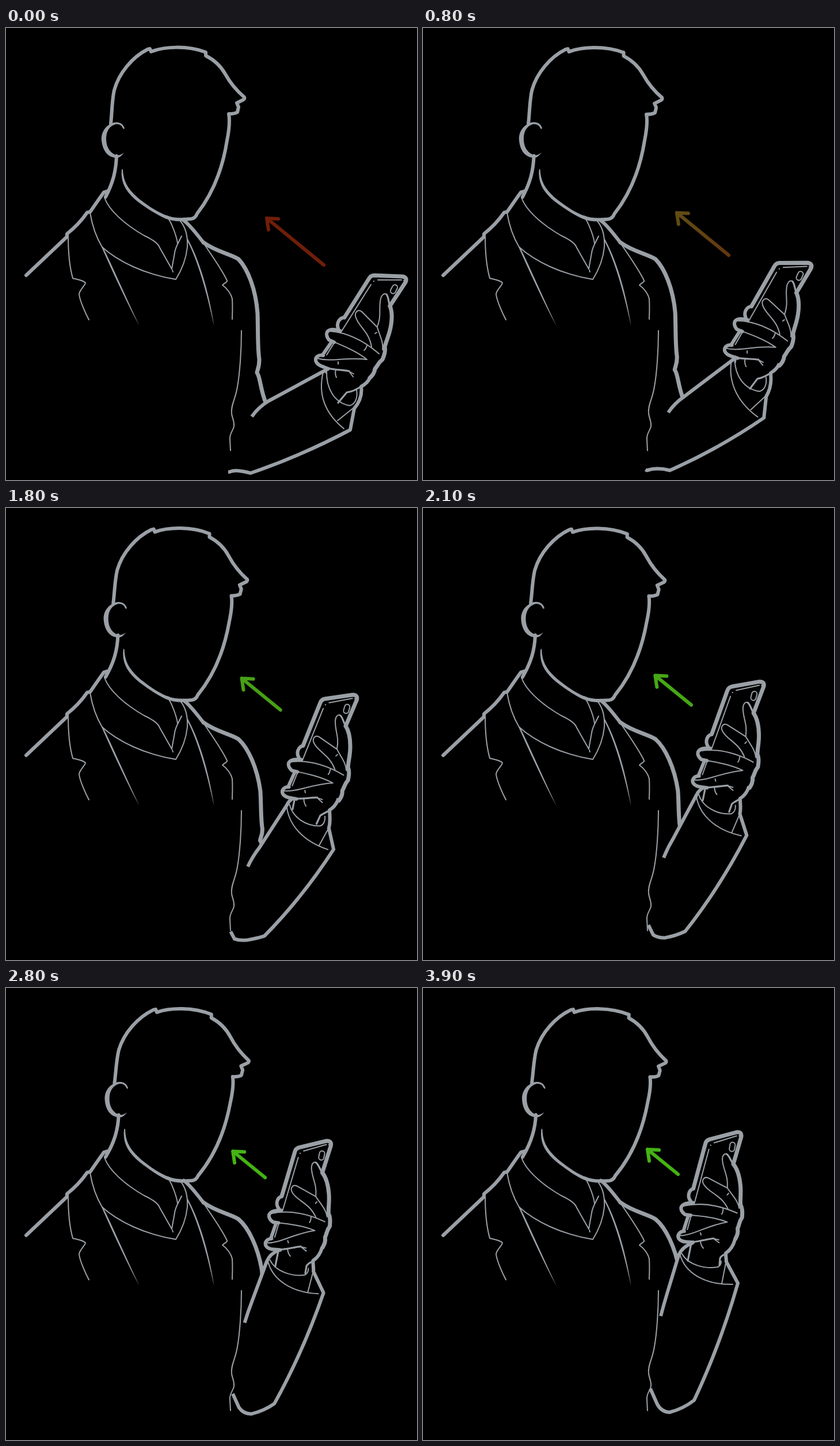
Write an HTML page that moves like this. It is 714 px wide and 784 px high and loops after 4 s.

```html
<!DOCTYPE html>
<html lang="en">
<head>
<meta charset="utf-8">
<title>Raise the phone</title>
<style>
html, body { margin: 0; width: 100%; height: 100%; overflow: hidden; background: #000; }
svg { display: block; width: 714px; height: 784px; }
.line { fill: none; stroke: #9aa0a6; stroke-linecap: round; stroke-linejoin: round; }
.thick { stroke-width: 6; }
.heavy { stroke-width: 7; }
.mid { stroke-width: 3.2; }
.thin { stroke-width: 2; }
.solid { fill: #9aa0a6; }
.mask { fill: #000; }
.butt { stroke-linecap: butt; }
</style>
</head>
<body>
<svg viewBox="0 0 714 784">
  <defs>
    <linearGradient id="tint" gradientUnits="userSpaceOnUse">
      <stop id="tipTint"/><stop id="tailTint" offset="1"/>
    </linearGradient>
  </defs>

  <g id="torso">
    <path class="line thick" d="M35 429L106 362V357C120 346 132 333 141 320L146 319C153 309 162 296 170 285L177 283"/>
    <path class="line thin" d="M108 360C108 395 112 420 116 434C122 436 133 437 138 442C138 446 127 455 127 462C128 472 138 495 144 506"/>
    <path class="line thin" d="M146 320C150 345 158 365 167 380C195 405 240 427 295 436C305 420 313 400 315 380C316 362 312 346 303 335"/>
    <path class="line thin" d="M171 294C178 315 205 340 240 360C255 367 265 374 267 381L288 418L293 390C294 380 300 372 305 361M283 332C288 340 297 362 298 374M289 420L290 423"/>
    <path class="solid" d="M166 380C184 420 209 475 232 517C212 475 188 420 168 379Z"/>
    <path class="solid" d="M314 367C334 405 349 460 361.500 517C353 460 337 405 316 366Z"/>
    <path class="line thin" d="M345 376C365 405 378 425 384 438C386 440 378 443 376 446C382 450 391 460 393 470C394 485 393 500 393 505"/>
    <path class="line thick" d="M309 334C320 342 335 362 342 371"/>
  </g>
  <path id="shoulder" class="line heavy"/>
  <path id="neck" class="line thick"/>

  <g id="head">
    <path class="line thick" d="M182 166C184 150 184 125 188 108C196 78 220 50 246 37L250 36L252 41C275 32 315 30 347 42V48C361 55 372 64 381 80C391 98 401 109 414 120Q415 122 413 124L401 130L404 137L402 146Q397 149 387 149C389 160 387 180 384 195C377 240 361 285 332 322Q329 330 322 331C305 333 290 333 279 328"/>
    <path class="solid" d="M201 246C199 268 208 285 230 302C248 315 262 324 278 331L281 326C262 319 248 309 232 297C213 281 204 268 203 246Q202 243 201 246Z"/>
    <path class="solid" d="M206 174C203 163 191 161 182 166C169 173 165 185 166 195C168 214 178 226 194 225C199 224 202 220 205 216C200 220 195 222 190 220C178 215 174 203 174 192C174 179 180 170 190 167C197 166 201 169 203 174Q205 176 206 174Z"/>
  </g>

  <path id="armFill" class="mask"/>
  <path class="line thin" d="M409 525C409 560 406 600 402 622C399 643 390 655 392 669C393 677 397 682 396 691C394 700 388 703 389 714L390 733"/>
  <path id="armTop" class="line thick butt"/>
  <path id="armLow" class="line thick butt"/>
  <path id="cuff" class="line thin"/>
  <path id="wrist" class="line mid"/>
  <path id="cuffRim" class="line thick"/>

  <g id="hand">
    <path class="line heavy" d="M588 502L631 434Q634 429 640 429L689 431Q698 433 694 441L667 482"/>
    <path class="line thin" d="M634 445L557 567M646 437L687 437M639 439V439.500M691 438V438.500"/>
    <rect class="line thin" x="669.500" y="445" width="9" height="16" rx="4.500" transform="rotate(27 674 453)"/>
    <path class="line thick" d="M588 502C578 503 574 513 577 521"/>
    <path class="line thick" d="M566 544L550 567"/>
    <path class="mask" d="M563 525C590 527 620 541 648 565L628 575C605 560 580 549 561 541Q552 532 563 525ZM541 572C560 580 590 570 627 575L600 597C580 590 560 592 541 584ZM608 497Q611 488 618 492L645 520L654 556L635 552C630 530 610 518 608 497Z"/>
    <path class="line thin" d="M563 526C590 528 620 541 648 565M561 541C580 549 607 559 627 575C590 570 565 580 541 573"/>
    <path class="line thick" d="M580 525C572 523 563 521 558 527Q555 533 561 541L570 545"/>
    <path class="line thick" d="M551 568C543 566 537 571 538 577C540 585 550 587 560 591"/>
    <path class="line mid" d="M558 590C572 593 585 593 596 595"/>
    <path class="line thin" d="M635 553C632 535 624 527 615 515C607 504 605 496 609 492Q613 488 618 492L645 519C649 533 656 545 654 558"/>
    <path class="line thin" d="M645 518C652 500 648 490 650 475C651 463 657 459 661 462"/>
    <path class="line thin" d="M641 530L644 528M622 559C625 557 626 554 627 551M577 579V583M573 592Q571 600 574 606M595 595L604 600M597 597L603 605"/>
    <path class="line mid" d="M661 462C665 467 664 475 667 482"/>
    <path class="line heavy" d="M667 482C671 492 671 505 668 520C665 535 661 541 658 553C660 562 656 570 654 575C646 581 646 586 641 591C640 599 636 603 632 607"/>
  </g>

  <path id="arrow" fill="none" stroke="url(#tint)" stroke-width="6" stroke-linecap="round" stroke-linejoin="round"/>
</svg>

<script>
const LOOP = 4000, STEP = 100;
const times = [0, 800, 1400, 1800, 2500, 3200, 3900];
const lift = [0, .145, .42, .605, .86, .966, 1];
const approach = [0, .192, .52, .69, .885, .975, 1];
const tipColors = [[112, 30, 10], [98, 76, 20], [80, 135, 20], [72, 160, 21], [68, 179, 20]];
const tailColors = [[112, 30, 10], [98, 55, 16], [80, 135, 20], [72, 160, 21], [68, 179, 20]];

const $ = id => document.getElementById(id);
const set = (id, attrs) => {
  for (const name in attrs) $(id).setAttribute(name, attrs[name]);
};
const mix = (a, b, k) => a + (b - a) * k;

function segment(t) {
  let i = 0;
  while (i < times.length - 2 && t >= times[i + 1]) i++;
  return i;
}

// Smooth curve through the keys, at rest at both ends.
function spline(vals, t) {
  const span = i => times[i + 1] - times[i];
  const rate = i => (vals[i + 1] - vals[i]) / span(i);
  const slope = i => i === 0 || i === vals.length - 1 ? 0 :
    (rate(i - 1) * span(i) + rate(i) * span(i - 1)) / (span(i - 1) + span(i));
  const i = segment(t), h = span(i), s = (t - times[i]) / h;
  const s2 = s * s, s3 = s2 * s;
  return vals[i] * (2 * s3 - 3 * s2 + 1) + vals[i + 1] * (3 * s2 - 2 * s3)
    + h * slope(i) * (s3 - 2 * s2 + s) + h * slope(i + 1) * (s3 - s2);
}

function color(list, t) {
  const i = segment(t), k = (t - times[i]) / (times[i + 1] - times[i]);
  const last = list.length - 1;
  const a = list[Math.min(i, last)], b = list[Math.min(i + 1, last)];
  return `rgb(${a.map((v, n) => Math.round(mix(v, b[n], k)))})`;
}

// Blends two paths of equal structure; each point may lag by its own exponent.
function morph(id, from, to, lags = []) {
  const ends = to.match(/[\d.]+/g);
  return p => {
    let n = 0;
    const d = from.replace(/[\d.]+/g, v => {
      const k = Math.pow(p, lags[n >> 1] || 1);
      return mix(+v, +ends[n++], k).toFixed(2);
    });
    $(id).setAttribute("d", d);
  };
}

const shapes = [
  morph("shoulder",
    "M343 372C365 388 390 392 404 401C420 418 434 453 437 495C438 530 437 555 440 575C440 590 436 594 436 598C442 605 441 625 452 652",
    "M343 372C365 388 390 392 404 401C422 416 438 450 445 488C447 505 446 530 449 545C449 555 445 559 445 563C451 570 450 590 461 617"),
  morph("neck", "M192 222C191 250 185 270 173 293", "M196 220C195 248 187 270 173 293"),
  morph("armFill",
    "M427 674L456 647L556 593L617 622L605 660L598 697L425 772L404 768L388 770L386 770Z",
    "M413 569L424 530L444 464L526 460L527 475L547 512L471 715L428 736L407 722L395 695Z",
    [1.4, 1.4, 1, 1, 1.13, 1.13, 1.3, 1.1, 1.5, 1.5]),
  morph("armTop",
    "M427 674Q438 658 456 647L556 593",
    "M413 569Q418 550 424 530L444 464",
    [1.4, 1.4, 1.4, 1]),
  morph("armLow",
    "M632 607Q628 616 617 622C619 636 615 648 605 660L598 697Q515 741 425 772Q414 769 404 768Q396 767 388 770L386 770",
    "M542 436Q538 452 526 460C526 467 527 471 527 475L547 512Q516 620 471 715Q452 730 428 736Q414 735 407 722L395 695",
    [1, 1, 1, 1, 1.08, 1.13, 1.13, 1.2, 1.3, 1.1, 1.1, 1.3, 1.5, 1.5]),
  morph("cuff",
    "M551 597C543 630 550 665 587 695M576 681L606 657M557 594C556 625 570 650 597 655C608 652 611 640 609 628",
    "M446 461C455 495 490 515 538 514M519 513L526 477M450 461C460 480 490 488 512 484C516 482 518 478 518 474",
    [1, 1, 1.08, 1.13, 1.13, 1.13]),
  morph("wrist",
    "M557 592L556 598M615 623Q602 631 592 632L577 650",
    "M466 443L460 473M526 461Q517 465 516 469L515 481"),
  morph("cuffRim",
    "M556 593Q556 592 558 592",
    "M444 464Q450 449 467 443")
];

function draw(t) {
  const p = spline(lift, t), a = spline(approach, t);
  shapes.forEach(shape => shape(p));
  set("head", { transform: `rotate(${1.78 * p} 220 390)` });

  const x = -119.5 * p, y = -162.5 * Math.pow(p, 1.07);
  set("hand", { transform: `translate(${x} ${y}) rotate(${-17.2 * p} 616 502.5)` });

  const x1 = mix(453, 390, a), y1 = mix(330, 280, a);
  const x2 = mix(552, 443, a), y2 = mix(411, 323, a);
  set("arrow", { d: `M${x2} ${y2}L${x1} ${y1}M${x1 + 20} ${y1 + 1}L${x1} ${y1}L${x1 + 3} ${y1 + 20}` });
  set("tint", { x1, y1, x2, y2 });
  set("tipTint", { "stop-color": color(tipColors, t) });
  set("tailTint", { "stop-color": color(tailColors, t) });
}

const start = performance.now();
function tick() {
  const t = (performance.now() - start) % LOOP;
  draw(Math.floor(t / STEP) * STEP);
  requestAnimationFrame(tick);
}
tick();
</script>
</body>
</html>
```
